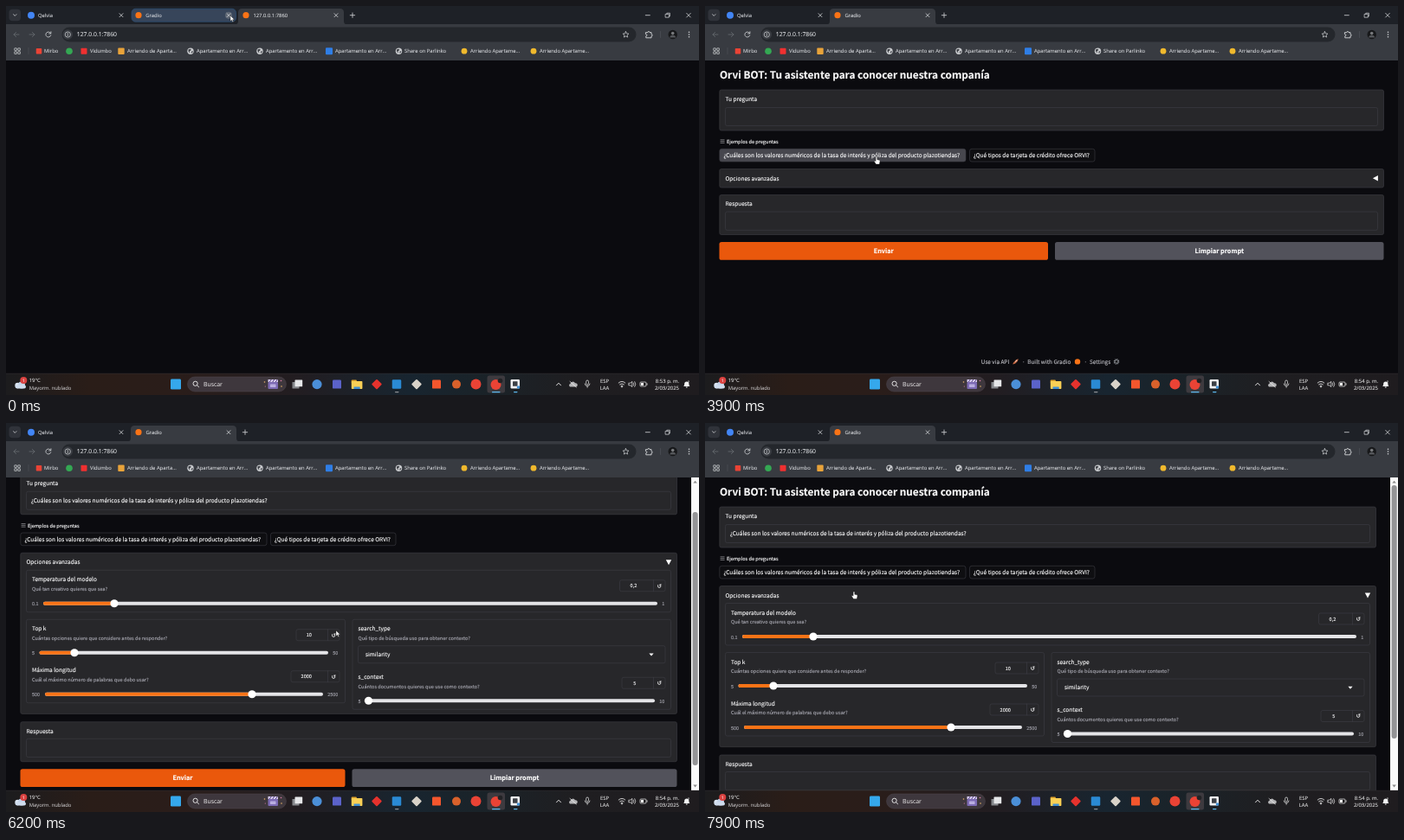
Animation of 800x450 px, one loop 8000 ms. Source, as an HTML page:

```html
<!DOCTYPE html>
<html lang="es">
<head>
<meta charset="utf-8">
<title>Asistente</title>
<style>
html, body { margin: 0; width: 100%; height: 100%; overflow: hidden; background: #0b0b0f; }
svg { display: block; width: 100vw; height: 100vh; }
text { white-space: pre; text-rendering: geometricPrecision; stroke-width: .06; }
.ui { font-family: "Open Sans", "Noto Sans", sans-serif; }
.page { font-family: "Noto Sans CJK JP", "Noto Sans CJK SC", "Noto Sans", sans-serif; }
.page text { stroke-width: .15; }
.symbol { font-family: "DejaVu Sans", sans-serif; }
</style>
</head>
<body>
<svg id="stage" viewBox="0 0 800 450"></svg>
<script>
const LOOP = 8000, STEP = 100, SCROLL = 61.5;
const QUESTION = '¿Cuáles son los valores numéricos de la tasa de interés y póliza del producto plazotiendas?';
const INK = '#f4f4f5', DIM = '#a1a1aa', PANEL = '#27272a', EDGE = '#3f3f46', ORANGE = '#f97316';

// Markup helpers
const rect = (x, y, w, h, fill, r = 0, more = '') =>
  `<rect x="${x}" y="${y}" width="${w}" height="${h}" rx="${r}" fill="${fill}" ${more}/>`;
const box = (x, y, x2, y2, fill = PANEL, r = 2, edge = EDGE, more = '') =>
  rect(x, y, x2 - x, y2 - y, fill, r, `stroke="${edge}" stroke-width=".6" ${more}`);
const dot = (x, y, r, fill) => `<circle cx="${x}" cy="${y}" r="${r}" fill="${fill}"/>`;
const square = (x, y, s, fill) => rect(x - s / 2, y - s / 2, s, s, fill, s * .12);
const diamond = (x, y, s, fill) => `<g transform="rotate(45 ${x} ${y})">${square(x, y, s, fill)}</g>`;
const line = (d, color = '#d5d7da', w = .8, more = '') =>
  `<path d="${d}" fill="none" stroke="${color}" stroke-width="${w}" stroke-linecap="round" stroke-linejoin="round" ${more}/>`;
const solid = (d, fill) => `<path d="${d}" fill="${fill}"/>`;
const text = (x, y, str, size = 6.53, fill = INK, more = '') =>
  `<text x="${x}" y="${y}" font-size="${size}" fill="${fill}" stroke="${fill}" ${more}>${str}</text>`;
const mid = (x, y, str, size, fill, more = '') => text(x, y, str, size, fill, 'text-anchor="middle" ' + more);
const ui = (x, y, str, size = 5.87, fill = '#dfe1e5', more = '') => text(x, y, str, size, fill, more);
const cross = (x, y, s = 2) => line(`M${x - s} ${y - s}l${2 * s} ${2 * s}m0 ${-2 * s}l${-2 * s} ${2 * s}`);
const globe = (x, y) => dot(x, y, 3.7, '#c8cacd') +
  solid(`M${x - 2.6} ${y - 1.6}q2.4 -1.6 3.4 .2q-1 1.4 -2 1.6l.8 2.2q-2.4 -1 -2.2 -4zM${x + 1} ${y + .6}l1.8 -.8q0 2 -1.8 2.8z`, '#3b3e44');

// Web page
function slider(x, right, y, name, info, value, boxX, track, knob, lo, hi) {
  const bar = y + 28, num = y + 7.5, cell = right - 13.5;
  return text(x, y + 2.5, name) +
    text(x, y + 13.3, info, 5.6, DIM) +
    box(boxX, num - 6.5, right, num + 6.5) +
    line(`M${cell} ${num - 6.5}v13`, EDGE, .6) +
    mid((boxX + cell) / 2 - 3.5, num + 2.1, value, 5.6, INK) +
    mid(cell + 6.7, num + 2.3, '↺', 6.6, INK, 'class="symbol"') +
    text(x, bar + 2.5, lo, 5.4, DIM) +
    rect(track[0], bar - 2, track[1] - track[0], 4, '#e4e4e7', 2) +
    rect(track[0], bar - 2, knob - track[0], 4, ORANGE, 2) +
    dot(knob, bar, 4.6, '#fff') +
    text(track[1] + 5.3, bar + 2.5, hi, 5.4, DIM);
}

const options = () =>
  box(23.5, 208.5, 767.5, 257) +
  slider(30, 761, 219, 'Temperatura del modelo', 'Qué tan creativo quieres que sea?', '0,2', 708.5, [43, 752], 125, '0.1', '1') +
  box(23.5, 265.5, 391.5, 362) +
  slider(30, 385, 276, 'Top k', 'Cuántas opciones quiere que considere antes de responder?', '10', 335, [38.5, 372], 79, '5', '50') +
  slider(30, 385, 324, 'Máxima longitud', 'Cuál el máximo número de palabras que debo usar?', '2000', 329, [45, 366], 284, '500', '2500') +
  box(400, 265.5, 767.5, 369.5) +
  text(406.5, 278.5, 'search_type') +
  text(406.5, 289.3, 'Qué tipo de búsqueda uso para obtener contexto?', 5.6, DIM) +
  box(406.5, 296, 761, 316) + text(415, 308.4, 'similarity') + solid('M742.4 304.8h5.2l-2.6 2.9z', '#fff') +
  slider(406.5, 761, 331.5, 's_context', 'Cuántos documentos quieres que use como contexto?', '5', 711, [414, 749], 418.5, '5', '10');

function page(open) {
  const R = open ? 774.5 : 783.5, c = (R + 16.5) / 2, drop = open ? 165.5 : 0;
  const foot = (open ? SCROLL : 0) + 413.8, fx = c - 400, bold = 'font-weight="600"';
  const grey = '#b9b9bf';
  return `<g id="${open ? 'open' : 'closed'}">` +
    text(17, 84.4, 'Orvi BOT: Tu asistente para conocer nuestra companía', 11.8, '#fafafa', bold) +
    box(16.8, 97, R, 144) + text(23.5, 110.4, 'Tu pregunta') +
    box(23.5, 117.5, R - 7, 138.5) +
    text(29, 129.8, QUESTION, 6.53, INK, 'class="answer"') +
    line('M18 154.8h4.2m-4.2 1.8h4.2m-4.2 1.8h4.2', '#d4d4d8', .5) +
    text(25, 158.9, 'Ejemplos de preguntas', 5.6) +
    box(16.8, 165.3, 301, 180, '#0e0e11', 2.5, EDGE, 'class="ex1"') + text(21.5, 175.2, QUESTION) +
    box(305.5, 165.3, 450, 180, '#0e0e11', 2.5, EDGE, 'class="ex2"') +
    text(310, 175.2, '¿Qué tipos de tarjeta de crédito ofrece ORVI?') +
    box(16.8, 188.5, R, open ? 374.7 : 210) + text(23.5, 201.6, 'Opciones avanzadas') +
    `<g transform="translate(${R - 9.5} 199.3)"><path class="mark" d="M-3.2 -2.9H3.2L0 3.1Z" fill="#fff"/></g>` +
    (open ? options() : '') +
    `<g transform="translate(0 ${drop})">` +
    box(16.8, 218.5, R, 264.5) + text(23.5, 231.4, 'Respuesta') + box(23.5, 238, R - 7, 259.3) +
    rect(16.5, 273, c - 20.5, 20.8, '#ea580c', 2.6) + rect(c + 4, 273, R - c - 4, 20.8, '#52525b', 2.6) +
    mid((12.5 + c) / 2, 286.2, 'Enviar', 7.3, '#fff', bold) +
    mid((R + c + 4) / 2, 286.2, 'Limpiar prompt', 7.3, '#fff', bold) + '</g>' +
    `<g transform="translate(${fx} ${foot})">` +
    text(318.8, 0, 'Use via API', 6.4, grey) + text(366, 0, '·', 6.4, grey) +
    solid('M355.3 .6q.2 -1.6 1.5 -2.7q2 -3 5 -3.4q-.3 3 -3.2 5q-1.4 1 -3.3 1.1z', '#c86a45') +
    line('M358.5 -2.6l1.4 -1.3', '#e8e0dc', 1) +
    text(372.3, 0, 'Built with Gradio', 6.4, grey) + dot(430, -2.4, 3.2, ORANGE) + text(437.5, 0, '·', 6.4, grey) +
    text(444, 0, 'Settings', 6.4, grey) +
    `<circle cx="475" cy="-2.4" r="2.7" fill="none" stroke="#8d9096" stroke-width="1.2" stroke-dasharray="1.3 .8"/>` +
    `<circle cx="475" cy="-2.4" r="1.8" fill="none" stroke="#8d9096" stroke-width=".9"/></g></g>`;
}

// Browser frame
function tabs() {
  return rect(0, 0, 800, 22, '#1e2127') +
    rect(3.5, 3.8, 13.5, 13.5, '#30333a', 4) + line('M8.6 9.7l1.7 1.7l1.7 -1.7') +
    dot(29, 10.7, 4, '#4285f4') + ui(37, 12.8, 'Qelvia') + cross(133, 10.7) +
    `<g id="oldTab">${rect(145, 3.2, 120.5, 15, '#37455a', 4.5, 'stroke="#2c5681" stroke-width=".6"')}` +
    dot(153, 10.7, 3.6, ORANGE) + ui(161.3, 12.8, 'Gradio') + dot(257, 10.7, 4, '#5d6673') + cross(257, 10.7) + '</g>' +
    `<g id="tab">${solid('M-4 21.5q4 0 4 -4v-10q0 -4.5 4.5 -4.5h113q4.5 0 4.5 4.5v10q0 4 4 4z', '#383b41')}` +
    dot(9, 10.7, 3.6, ORANGE) + ui(17.4, 12.8, '', 5.87, '#e8eaed', 'id="tabName"') +
    cross(113, 10.7) + line('M129.3 10.7h5.4m-2.7 -2.7v5.4') + '</g>' +
    line('M738.3 10.7h5') + line('M761.5 9.4h3.8v3.8h-3.8zM762.8 9.2v-1h3.6v3.7h-1', '#d5d7da', .7) + cross(788, 10.7, 2.3);
}

function toolbar() {
  const off = '#686c72';
  return rect(0, 21, 800, 42, '#383b41') +
    line('M15 33h-6m2.6 -2.6l-2.6 2.6l2.6 2.6', off) + line('M27 33h6m-2.6 -2.6l2.6 2.6l-2.6 2.6', off) +
    line('M51.6 31.6a3 3 0 1 0 .2 2.3m.1 -4.2v2.2h-2.2') +
    rect(64.5, 24.5, 663, 17, '#24272c', 8.5) + dot(71.3, 33, 5.8, '#383b41') +
    `<circle cx="71.3" cy="33" r="3.1" fill="none" stroke="#d5d7da" stroke-width=".7"/>` +
    line('M71.3 32.8v1.5m0 -2.9v.1') + ui(81.8, 35.4, '127.0.0.1:7860', 6.82, '#e8eaed') +
    line('M715.5 29.6l1 2.2l2.4 .3l-1.8 1.6l.5 2.4l-2.1 -1.2l-2.1 1.2l.5 -2.4l-1.8 -1.6l2.4 -.3z', '#d5d7da', .7) +
    line('M738.8 30.6h2a1.1 1.1 0 1 1 2.2 0h2v2.1a1.1 1.1 0 1 1 0 2.2v1.9h-6.2v-2a1.1 1.1 0 1 0 0 -2.2z', '#d5d7da', .9) +
    line('M755.5 29.5v7', '#53575d', .6) +
    dot(769.7, 33, 5.2, '#17181a') + dot(769.7, 31.6, 1.8, '#77797c') + solid('M766.3 36.6q0 -2.8 3.4 -2.8t3.4 2.8z', '#55575b') +
    [30.3, 33, 35.7].map(y => dot(788.5, y, .8, '#d5d7da')).join('');
}

function bookmarks() {
  const place = 'Apartamento en Arr...', rent = 'Arriendo Apartame...';
  const items = [[44, 'Mirbo'], [97, 'Vidumbo'], [140, 'Arriendo de Aparta...'], [220, place], [300, place],
    [380, place], [460, 'Share on Parlinko'], [536, rent], [616, rent]];
  let grid = '';
  for (const x of [11, 15]) for (const y of [50, 54]) grid += rect(x - 1.2, y - 1.2, 2.6, 2.6, 'none', .2, 'stroke="#d5d7da" stroke-width=".7"');
  return grid + line('M26 48.5v7', '#53575d', .6) +
    square(38, 52.2, 6.5, '#ea4335') + dot(73, 52.2, 3.8, '#34a853') + square(90, 52.2, 7, '#f03030') +
    square(133, 52.2, 7.4, '#e8a33a') + globe(213, 52.2) + globe(293, 52.2) + square(373, 52.2, 8, '#2f7ee6') +
    globe(453.5, 52.2) + dot(529, 52.2, 3.4, '#f0b92d') + dot(609, 52.2, 3.4, '#f0b92d') +
    items.map(([x, s]) => ui(x, 54.4, s)).join('');
}

function taskbar() {
  const y = 437.6, white = '#f2f2f2';
  return rect(0, 425, 800, 25, 'url(#bar)') + line('M0 425.2h800', '#343033', .5) +
    dot(13.5, 439, 3.2, '#dbe5f2') + dot(18, 438.5, 4, '#c4d4ea') + rect(11, 438.5, 12, 4, '#cfdced', 2) +
    dot(20.3, 433, 4, '#d9413f') + mid(20.3, 434.8, '1', 5, '#fff') +
    ui(26.7, 435.3, '19°C', 5.87, white) + ui(26.7, 443.6, 'Mayorm. nublado', 5.87, '#c9c7c8') +
    square(196, y, 12, '#35a8ec') +
    rect(209.5, 429, 114, 17, '#3e373d', 8.5, 'stroke="#4c454b" stroke-width=".5"') +
    `<circle cx="218.6" cy="436.8" r="2.6" fill="none" stroke="${white}" stroke-width=".9"/>` + line('M220.6 438.8l2 2', white, .9) +
    ui(228, 440, 'Buscar', 6.9, '#e6e4e5') +
    rect(302.5, 435, 11.5, 8, '#7d6bb5', 1) + rect(302.5, 432, 11.5, 3, '#d9cdf0', .5) +
    line('M304.5 434.6l1.5 -2.2m2 2.2l1.5 -2.2m2 2.2l1.5 -2.2', '#4a3a78', 1) +
    rect(305, 437.5, 6.5, 3.5, '#b9aee0', .6) +
    dot(298.5, 435, .8, '#e8b36a') + dot(299.3, 440, .6, '#e07fa8') + dot(317.5, 433.5, .8, '#e07fa8') + dot(318, 440, .8, '#e8b36a') +
    rect(330.5, 435, 8, 7.5, '#85878b', .6) + rect(333.5, 432.5, 8.7, 7.8, '#e6e7e9', .6) +
    dot(359, y, 5.6, '#4b8fd8') + square(382, y, 10, '#5b62c9') +
    rect(398.8, 432.5, 6, 4, '#e0a32b', .8) + rect(398.8, 434, 12.6, 9, '#f9cf55', .8) + rect(401.5, 440.5, 7.2, 2.5, '#3f8fd4', .5) +
    diamond(428, y, 8.6, '#e5322d') + square(451, y, 10.5, '#2a8ad4') + diamond(474, y, 8.6, '#d8d2c8') +
    square(497, y, 10, '#f4562d') + dot(520, y, 5, '#d9612b') + dot(542.5, y, 6, '#ea4335') +
    rect(555.5, 427.5, 20.5, 20, '#3d3a3f', 2.5) + dot(565.5, y + .3, 6, '#ea4335') + dot(570.5, 433.5, 2.8, '#232326') +
    rect(582.5, 432, 10.5, 10.5, '#f0f1f3', 1.2) + rect(585, 434.3, 5.5, 5.5, '#3c4046', .5) + dot(591.5, 441, 1.8, '#3f8fd4') +
    rect(449, 446, 4.5, 1.2, '#8f9196', .6) + rect(561, 446, 9.5, 1.3, '#5cb8ee', .6) + rect(586, 446, 4.5, 1.2, '#5cb8ee', .6) +
    line('M635.5 438.8l2.5 -2.6l2.5 2.6', white, .9) +
    solid('M651 440.5a2 2 0 0 1 .4 -3.6a3 3 0 0 1 5.6 -.6a2.1 2.1 0 0 1 1.2 4.2z', '#b5b5b7') + line('M651 434.4l7.4 6.6', white, .7) +
    rect(669.7, 433, 2.8, 5, 'none', 1.4, `stroke="${white}" stroke-width=".7"`) + line('M668.2 437q.2 2.6 2.9 2.6t2.9 -2.6m-2.9 2.8v1.6', white, .7) +
    mid(691, 435.6, 'ESP', 5.87, white) + mid(691, 443.8, 'LAA', 5.87, white) +
    line('M707.2 436q3.8 -3.4 7.6 0m-6.2 1.8q2.4 -2 4.8 0m-3.4 1.6q1 -.8 2 0', white, .8) + dot(711, 440.6, .8, white) +
    line('M719.2 436.2h1.6l2 -1.8v6.2l-2 -1.8h-1.6zM724.4 436q1 1.5 0 3m1.4 -4.4q2.2 2.9 0 5.8', white, .7) +
    rect(732, 435, 7, 5, 'none', 1, `stroke="${white}" stroke-width=".7"`) + rect(733, 436, 3, 3, white) + line('M740 436.8v1.4', white) +
    text(777, 435.6, '', 5.95, white, 'id="clock" text-anchor="end"') + text(777, 443.8, '2/03/2025', 5.95, white, 'text-anchor="end"') +
    solid('M782.2 440q1 -1 1 -3a2.6 2.6 0 0 1 5.2 0q0 2 1 3zM784.7 440.6h2.2a1.1 1.1 0 0 1 -2.2 0z', white) + ui(787, 436.3, 'z', 4, white);
}

const scrollbar = () =>
  rect(791, 63, 9, 362, '#fafafa') + solid('M793.3 69.6h4.6l-2.3 -2.8zM793.3 418.6h4.6l-2.3 2.8z', '#8b8b8b') +
  rect(792.5, 72, 6.2, 293, '#949496', 3, 'id="thumb"');

const cursors =
  `<g id="cursor"><path id="arrow" d="M0 0V6.6L1.5 5.2L2.6 7.6L3.6 7.1L2.6 4.8H4.7Z" fill="#fff" stroke="#111" stroke-width=".4"/>` +
  `<path id="hand" transform="translate(0 .5)" d="M-.9 .6Q0 -.8 .8 .6V3.2L3.4 3.8Q4.2 4.1 4 5.2L3.3 8.6H-.6L-2.7 5.3Q-2.8 4.3 -1.6 4.6L-.9 5.2Z" fill="#fff" stroke="#111" stroke-width=".4"/>` +
  `<path id="beam" d="M-1.3 -3.4H1.3M0 -3.4V3.4M-1.3 3.4H1.3" fill="none" stroke="#d8d8da" stroke-width=".6"/></g>`;

const stage = document.getElementById('stage');
stage.innerHTML =
  `<defs><clipPath id="view">${rect(0, 63, 800, 362, '#000')}</clipPath><linearGradient id="bar">` +
  [[0, '#1c1c1e'], [.12, '#2a1d18'], [.25, '#2a1d1a'], [.42, '#221d21'], [.58, '#182530'], [.68, '#1a2329'], [.82, '#1f1e21'], [1, '#1f1c1f']]
    .map(([o, c]) => `<stop offset="${o}" stop-color="${c}"/>`).join('') + '</linearGradient></defs>' +
  rect(0, 0, 800, 450, '#0b0b0f') +
  `<g class="page" clip-path="url(#view)"><g id="scroll">${page(false)}${page(true)}</g>` +
  `<g id="bars">${scrollbar()}</g></g>` +
  `<g class="ui">${tabs()}${toolbar()}${bookmarks()}${taskbar()}</g>` + cursors;

// Motion
const $ = id => document.getElementById(id);
const all = (cls, name, value) => stage.querySelectorAll('.' + cls).forEach(n => n.setAttribute(name, value));
const show = (node, on) => { node.style.display = on ? '' : 'none'; };
const part = (t, a, b) => Math.min(1, Math.max(0, (t - a) / (b - a)));
const smooth = p => p * p * (3 - 2 * p);
const easeOut = p => 1 - (1 - p) ** 2.4;
const inside = (x, y, x1, y1, x2, y2) => x >= x1 && x <= x2 && y >= y1 && y <= y2;

const PATH = [[0, 259, 11], [200, 259, 11], [700, 266, 160], [900, 265, 168], [1200, 268, 170], [1800, 335, 153],
  [2100, 350, 152], [2900, 346, 153], [3600, 210, 170], [3900, 198, 174], [4600, 196, 173], [5100, 180, 182],
  [5600, 155, 202], [5850, 155, 202], [6200, 381, 240], [7000, 381, 240], [7600, 188, 202], [7900, 172, 194.5]];

function pointer(t) {
  const i = Math.max(1, PATH.findIndex(k => k[0] >= t));
  const [a, x1, y1] = PATH[i - 1], [b, x2, y2] = PATH[i], p = smooth(part(t, a, b));
  return [x1 + (x2 - x1) * p, y1 + (y2 - y1) * p];
}

function draw(t) {
  const loaded = t >= 500, open = t >= 5700;
  const slide = easeOut(part(t, 200, 400));
  const offset = SCROLL * (easeOut(part(t, 6050, 6500)) - easeOut(part(t, 7000, 7400)));
  const [x, y] = pointer(t), py = y + offset;

  show($('oldTab'), t < 200);
  $('tab').setAttribute('transform', `translate(${268 - 124 * slide} 0)`);
  $('tabName').textContent = loaded ? 'Gradio' : '127.0.0.1:7860';
  $('clock').textContent = loaded ? '8:54 p. m.' : '8:53 p. m.';

  show($('closed'), loaded && !open);
  show($('open'), open);
  show($('bars'), open);
  all('answer', 'visibility', t >= 4600 ? 'visible' : 'hidden');
  all('mark', 'transform', `rotate(${90 * (1 - easeOut(part(t, 5720, 5870)))})`);
  $('scroll').setAttribute('transform', `translate(0 ${-offset})`);
  $('thumb').setAttribute('y', 72 + offset * 50 / SCROLL);

  const onPage = loaded && y > 63;
  const ex1 = onPage && inside(x, py, 17, 165, 301, 180);
  const ex2 = onPage && inside(x, py, 305, 165, 450, 180);
  all('ex1', 'fill', ex1 ? '#47474e' : '#0e0e11');
  all('ex2', 'fill', ex2 ? '#47474e' : '#0e0e11');
  const hand = ex1 || ex2 || onPage && inside(x, py, 17, 188.5, 774, 210);
  const beam = onPage && (inside(x, py, 23, 117, 767, 139) || open && inside(x, py, 376, 297, 386, 309));
  $('cursor').setAttribute('transform', `translate(${x} ${y})`);
  show($('hand'), hand);
  show($('beam'), beam);
  show($('arrow'), !hand && !beam);
}

const start = performance.now();
function tick() {
  const t = (performance.now() - start) % LOOP;
  draw(Math.floor(t / STEP) * STEP);
  requestAnimationFrame(tick);
}
tick();
</script>
</body>
</html>
```
